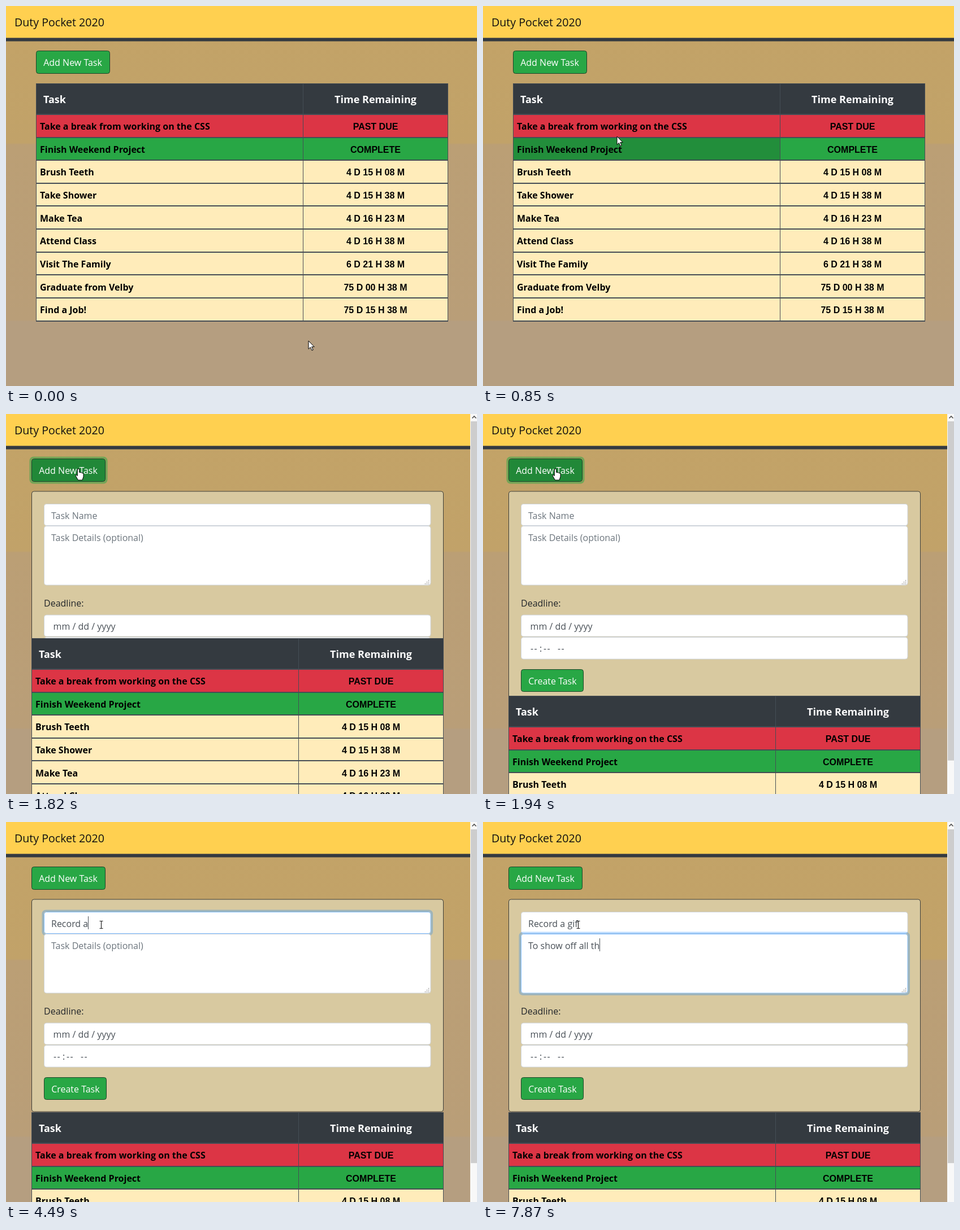
Recreate the animation shown at these times as an HTML page. Size 833 by 673 pixels, loop 7.99 s.

```html
<!DOCTYPE html>
<html lang="en">
<head>
<meta charset="utf-8">
<title>Task list</title>
<style>
html, body { margin: 0; width: 100%; height: 100%; overflow: hidden; }
svg { display: block; font: 16px "Open Sans", "Noto Sans", sans-serif; }
.bold { font-weight: 700; }
.time { font: bold 16px "Liberation Sans", Arial, sans-serif; text-anchor: middle; }
</style>
</head>
<body>
<svg id="stage" width="833" height="673" viewBox="0 0 833 673"></svg>
<script>
const LOOP = 7990, STEP = LOOP / 66, FORM_HEIGHT = 377, ROW = 40.62;
const DARK = '#343a40', GREEN = '#28a745', RED = '#dc3545', CREAM = '#ffecba', INK = '#495057';
const stage = document.getElementById('stage');
const ruler = document.createElement('canvas').getContext('2d');

const tasks = [
  ['Take a break from working on the CSS', 'PAST DUE', RED],
  ['Finish Weekend Project', 'COMPLETE', GREEN],
  ['Brush Teeth', '4 D 15 H 08 M'],
  ['Take Shower', '4 D 15 H 38 M'],
  ['Make Tea', '4 D 16 H 23 M'],
  ['Attend Class', '4 D 16 H 38 M'],
  ['Visit The Family', '6 D 21 H 38 M'],
  ['Graduate from Velby', '75 D 00 H 38 M'],
  ['Find a Job!', '75 D 15 H 38 M'],
];

// pointer path: time, x, y
const path = [
  [130, 535, 593], [250, 525, 573], [370, 480, 505], [490, 410, 405], [610, 339, 308],
  [730, 283, 265], [850, 238, 232], [970, 200, 203], [1090, 168, 165], [1210, 144, 126],
  [1330, 131, 101], [1450, 128, 97], [2050, 128, 97], [2180, 140, 124], [2300, 158, 165], [2415, 168, 182],
];

// typing runs: start, characters, interval
const nameRuns = [[3400, 2, 240], [3890, 8, 120], [4850, 2, 0]];
const detailRuns = [[5950, 7, 120], [6670, 1, 0], [6790, 5, 120], [7510, 4, 120], [7870, 1, 0]];

const clamp = v => Math.max(0, Math.min(1, v));
const rowTop = i => Math.round(192 + i * ROW);
const rect = (x, y, w, h, fill, more = '') =>
  `<rect x="${x}" y="${y}" width="${w}" height="${h}" fill="${fill}" ${more}/>`;
const text = (x, y, s, fill = '#000', more = '') => `<text x="${x}" y="${y}" fill="${fill}" ${more}>${s}</text>`;
const line = (x1, y1, x2, y2, w = 1, color = '#454d55') =>
  `<path d="M${x1} ${y1}L${x2} ${y2}" stroke="${color}" stroke-width="${w}"/>`;

function ease(p) {
  if (p <= 0 || p >= 1) return clamp(p);
  let lo = 0, hi = 1;
  const bezier = (s, a, b) => 3 * (1 - s) * (1 - s) * s * a + 3 * (1 - s) * s * s * b + s * s * s;
  for (let i = 0; i < 20; i++) {
    const mid = (lo + hi) / 2;
    if (bezier(mid, .25, .25) < p) lo = mid; else hi = mid;
  }
  return bezier(lo, .1, 1);
}

function pointerAt(t) {
  const i = path.findIndex(p => p[0] > t);
  if (i === 0) return path[0].slice(1);
  if (i < 0) return path[path.length - 1].slice(1);
  const [t0, x0, y0] = path[i - 1], [t1, x1, y1] = path[i], f = (t - t0) / (t1 - t0);
  return [x0 + (x1 - x0) * f, y0 + (y1 - y0) * f];
}

function typed(full, runs, t) {
  let n = 0;
  for (const [start, count, gap] of runs)
    for (let i = 0; i < count; i++) if (t >= start + i * gap) n++;
  return full.slice(0, n);
}

function ring(x, y, w, h, color, opacity) {
  return opacity <= 0 ? '' : rect(x - 1.75, y - 1.75, w + 3.5, h + 3.5, 'none',
    `rx="5.5" stroke="${color}" stroke-width="3.5" stroke-opacity="${opacity}"`);
}

function button(x, y, w, h, label, fill = GREEN) {
  return rect(x + .5, y + .5, w - 1, h - 1, fill, 'rx="4" stroke="#1d4429"') + text(x + 13.2, y + 27, label, '#fff');
}

function field(y, h, focus = 0) {
  return ring(67, y, 684.5, h, '#007bff', focus * .27) +
    rect(67.5, y + .5, 683.5, h - 1, '#fff', `rx="4" stroke="${focus > .5 ? '#80bdff' : '#ced4da'}"`);
}

function entry(value, hint, y, caret) {
  ruler.font = '16px "Open Sans", "Noto Sans", sans-serif';
  const end = Math.round(80 + ruler.measureText(value).width);
  return (value ? text(80, y, value, INK) : text(80, y, hint, '#6c757d')) +
    (caret ? rect(end, y - 19, 1, 23, INK) : '');
}

function form(t, q) {
  const detailFocus = clamp((q - 5040) / 150);
  const nameFocus = clamp((q - 2480) / 150) * (1 - detailFocus);
  const nameCaret = t >= 2540 && t < 5090 && !(t >= 3030 && t < 3400);
  const detailCaret = t >= 5090 && !(t >= 5700 && t < 5950);
  return rect(45.5, 137, 728, 376, '#d8c9a0', 'rx="4" stroke="#3f3f3a"') +
    field(159, 39, nameFocus) + entry(typed('Record a gif', nameRuns, t), 'Task Name', 186, nameCaret) +
    field(198, 105.5, detailFocus) +
    entry(typed('To show off all th', detailRuns, t), 'Task Details (optional)', 225, detailCaret) +
    '<path d="M747.5 294v8M744.5 297v5M741.5 300v2" stroke="#999" stroke-width="1.5" stroke-dasharray="1.5 1.5"/>' +
    text(67, 341, 'Deadline:', '#212529') +
    field(355.5, 39) + text(83.5, 382, 'mm / dd / yyyy', INK) +
    field(395, 39.5) + [[84, '--'], [100, ':'], [107, '--'], [132, '--']]
      .map(([x, s]) => text(x, 421, s, INK, 'letter-spacing="1.3"')).join('') +
    button(67, 452, 111, 40, 'Create Task');
}

function table(hoverRow) {
  let out = rect(45, 137, 729, 55, DARK) +
    text(58, 172, 'Task', '#fff', 'class="bold" font-size="18"') +
    text(645.5, 172, 'Time Remaining', '#fff', 'class="bold" font-size="18" text-anchor="middle"');
  tasks.forEach(([name, left, color = CREAM], i) => {
    const y = rowTop(i), height = rowTop(i + 1) - y, baseline = Math.round(219.2 + i * ROW);
    out += rect(45, y, 729, height, color) +
      (i === hoverRow ? rect(45, y, 473, height, '#000', 'opacity=".15"') : '') +
      text(52, baseline, name, '#000', 'class="bold"') +
      text(645.5, baseline, left, '#000', 'class="time"');
  });
  for (let i = 0; i <= tasks.length; i++) out += line(45, rowTop(i), 774, rowTop(i), 2, '#454d55');
  return out + line(517.5, 137, 517.5, 558) + rect(45.5, 137.5, 728, 421, 'none', 'stroke="#454d55"');
}

function pointer(x, y, shape) {
  const shapes = {
    arrow: '<path d="M0 0V14.5L3.4 11.4 6 17 8.2 16 5.7 10.6H10.2Z" fill="#fff" stroke="#000"/>',
    hand: '<path d="M-1.7 .8Q0 -1 1.7 .8V6.5Q3 5.5 4.4 7Q6 6 7 7.8Q9 7.5 9 9.5V14L7 20H-.5L-4.8 12.5Q-5 10.5 -3 11L-1.7 12.5Z" fill="#fff" stroke="#000"/>',
    beam: '<path d="M-2.5 -6.5H3.5M.5 -6.5V6.5M-2.5 6.5H3.5" fill="none" stroke="#222" stroke-width="1.2"/>',
  };
  return `<g transform="translate(${Math.round(x)} ${Math.round(y)})">${shapes[shape]}</g>`;
}

function scrollbar(offset) {
  const thumb = 731 * 765 / (569 + offset);
  return rect(821, 0, 12, 673, '#f8f8f8') + rect(822, 13, 11, thumb, '#cdcdcd') +
    '<path d="M824.5 7.5L828 4 831.5 7.5" fill="none" stroke="#505050" stroke-width="1.6"/>';
}

function render(t) {
  const q = Math.floor((t + 6) / STEP) * STEP;
  const offset = Math.round(FORM_HEIGHT * ease((q - 1674) / 350));
  const scrolls = offset > 196;
  const [x, y] = pointerAt(q + 5), [hx, hy] = pointerAt(q - 40);
  const onButton = x > 45 && x < 184 && y > 79 && y < 120;
  const onField = offset > 60 && y > 159 && x > 67;
  const hoverRow = !offset && hx < 525 ? Math.floor((hy - 192) / ROW) : -1;
  const buttonFocus = clamp((q - 1600) / 150) * (1 - clamp((q - 2480) / 150));

  return `<defs><linearGradient id="sand" x2="0" y2="1">
    <stop stop-color="#c3a367"/><stop offset=".36" stop-color="#c1a269"/>
    <stop offset=".365" stop-color="#bb9f75"/><stop offset=".826" stop-color="#b99e78"/>
    <stop offset=".83" stop-color="#b59e80"/><stop offset="1" stop-color="#b59e80"/></linearGradient></defs>` +
    rect(0, 0, 833, 673, 'url(#sand)') +
    rect(0, 0, 833, 56.5, '#ffd050') + rect(0, 56.5, 833, 6, DARK) +
    text(15, 36, 'Duty Pocket 2020', '#111', 'font-size="19.6"') +
    `<g transform="translate(${scrolls ? 0 : 8} 0)">` +
    ring(45, 79, 131, 41, GREEN, buttonFocus * .5) +
    button(45, 79, 131, 41, 'Add New Task', onButton ? '#218838' : GREEN) +
    (offset ? form(t, q) : '') +
    `<g transform="translate(0 ${offset})">${table(hoverRow)}</g></g>` +
    (scrolls ? scrollbar(offset) : '') +
    pointer(x, y, onButton ? 'hand' : onField ? 'beam' : 'arrow');
}

let shown = '';
const begin = performance.now();
function tick() {
  const markup = render((performance.now() - begin) % LOOP);
  if (markup !== shown) stage.innerHTML = shown = markup;
  requestAnimationFrame(tick);
}
tick();
</script>
</body>
</html>
```
